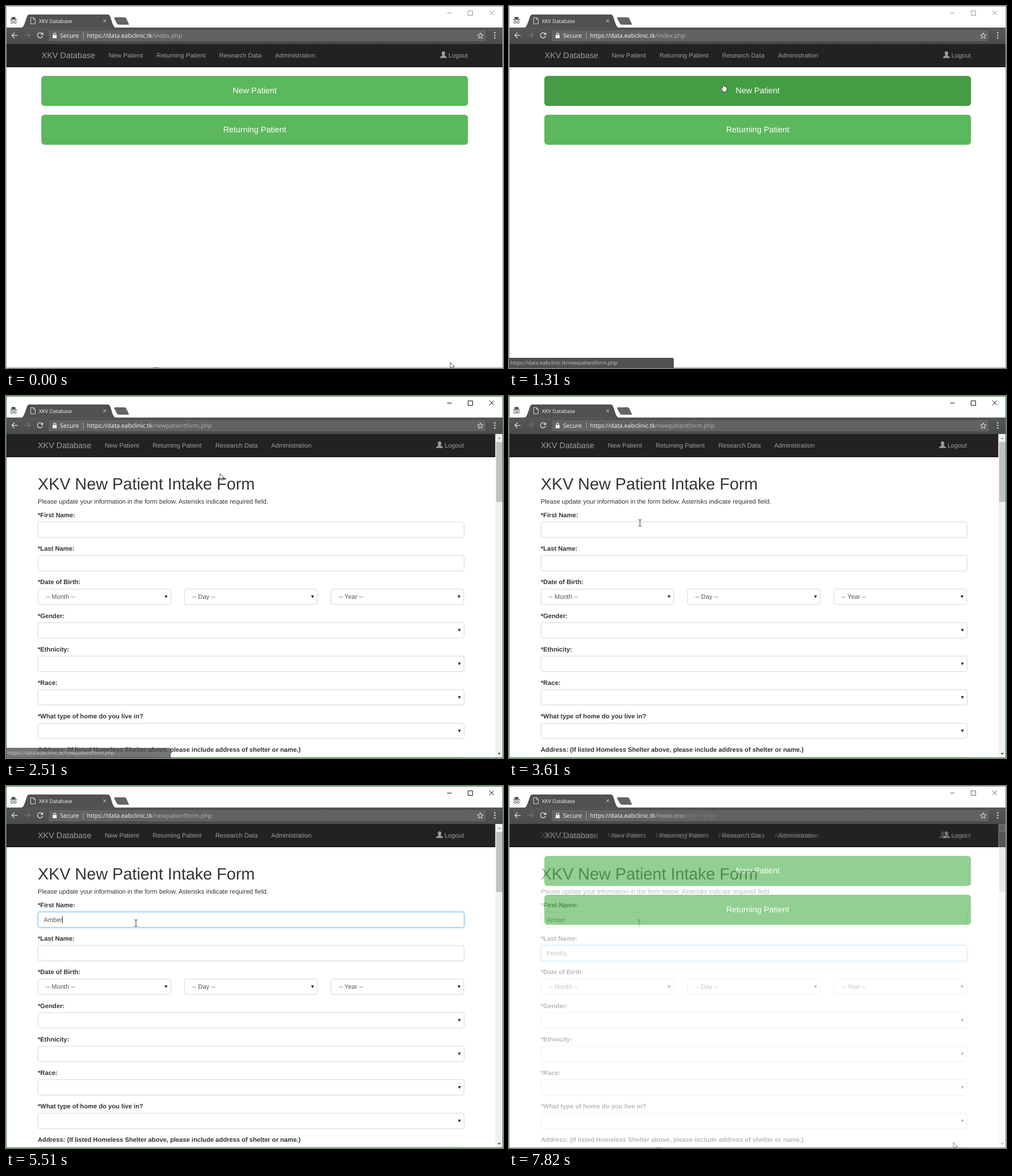
Animation, 876 px wide and 639 px high, one loop 7.89 s. Source, as an HTML page:

```html
<!DOCTYPE html>
<html lang="en">
<head>
<meta charset="utf-8">
<title>XKV Database</title>
<style>
  html, body { margin: 0; width: 100%; height: 100%; overflow: hidden; background: #fff; }
  svg { display: block; }
  text { font-family: "Liberation Sans", Arial, sans-serif; font-size: 11.2px; text-rendering: geometricPrecision; white-space: pre; }
  .ui { font-family: "Open Sans", "Noto Sans", sans-serif; }
  .nav text { fill: #9d9d9d; }
  .label { font-weight: 700; fill: #333; }
  .value { fill: #555; }
  .btn { fill: #5cb85c; stroke: #4cae4c; stroke-width: .8; }
  .btn.hover { fill: #449d44; stroke: #398439; }
  .btn.down { fill: #398439; stroke: #255625; }
  .field { fill: #fff; stroke: #ccc; stroke-width: .8; }
  .field.focus { stroke: #66afe9; filter: drop-shadow(0 0 2.5px rgba(102, 175, 233, .6)); }
  .line { fill: none; }
</style>
</head>
<body>
<svg id="stage" width="876" height="639" viewBox="0 0 876 639">
  <defs>
    <linearGradient id="bar" x1="0" y1="0" x2="0" y2="1">
      <stop offset="0" stop-color="#565757"/><stop offset="1" stop-color="#4a4b4b"/>
    </linearGradient>
    <linearGradient id="press" x1="0" y1="0" x2="0" y2="1">
      <stop offset="0" stop-opacity=".18"/><stop offset="1" stop-opacity="0"/>
    </linearGradient>
  </defs>
  <g id="form"></g>
  <g id="home"></g>
</svg>
<script>
const LOOP = 7890, SWAP = 2190, ACTIVE = 1950, FADE = 7620;
const SITE = 'data.eabclinic.tk';
const FIELD_TOP = 222.4, ROW = 59.2, SHIFT = -6.8;

// time, x, y of the pointer hotspot
const PATH = [
  [50, 783, 629], [300, 640, 480], [560, 443, 280], [700, 408, 222],
  [810, 404, 200], [860, 400, 185], [980, 386, 152], [1200, 378, 138],
  [1380, 377, 137], [3070, 377, 137], [3200, 350, 152], [3400, 270, 190],
  [3610, 231, 224], [3700, 221, 229], [3810, 219, 230], [3930, 225, 237],
  [4000, 229, 242]
];
const FIRST = { word: 'Amber', keys: [4840, 5120, 5260, 5390, 5450] };
const LAST = { word: 'Pendry', keys: [6300, 6620, 6700, 6880, 6980, 7080] };

const $ = id => document.getElementById(id);
const rect = (x, y, w, h, fill, more = '') =>
  `<rect x="${x}" y="${y}" width="${w}" height="${h}" fill="${fill}" ${more}/>`;
const text = (x, y, str, more = '') => `<text x="${x}" y="${y}" ${more}>${str}</text>`;
const line = (d, color, width = 1, more = '') =>
  `<path class="line" d="${d}" stroke="${color}" stroke-width="${width}" ${more}/>`;
const fill = (d, color, more = '') => `<path d="${d}" fill="${color}" ${more}/>`;

const POINTERS = {
  arrow: fill('M0 0V10.6L2.5 8.4 4.2 12.2 5.9 11.4 4.3 7.7H7.6Z', '#fff', 'stroke="#222" stroke-width=".8"'),
  hand: fill('M-.9 .6Q0-.8 .9 .6V4.8Q2-.1 2.9 5Q4.2 4 4.7 5.6Q6.3 4.8 6.6 6.6V10Q6.2 12 5.2 14H-.4Q-1.2 11.6-3.1 9Q-4.3 7.2-3 6.9Q-2-.1-.9 8.4Z'.replace('Q-2-.1-.9 8.4', 'Q-2 7-.9 8.4'),
    '#fff', 'stroke="#222" stroke-width=".8" stroke-linejoin="round"'),
  beam: line('M-2.6-5.6H-.7L0-5 .7-5.6H2.6M0-5V5M-2.6 5.6H-.7L0 5 .7 5.6H2.6', '#333', 1)
};
const pointer = id => `<g id="${id}">` + Object.entries(POINTERS)
  .map(([kind, art]) => `<g data-kind="${kind}">${art}</g>`).join('') + '</g>';

function tabStrip(ink) {
  return rect(0, 0, 876, 639, '#fff') +
    fill('M9.3 23.2 10.2 19.3 12 19.8 13.3 19.3 15.2 19.8 16 19.3 17.3 23.2Z', '#444') +
    line('M7 24.4H19.6', '#444', 1.1) +
    '<g fill="none" stroke="#444"><circle cx="10.4" cy="28.7" r="2"/><circle cx="16.2" cy="28.7" r="2"/></g>' +
    line('M12.4 28.2H14.2', '#444') +
    fill('M28 38C32 37 35 23 37.5 17.5Q38.6 15 41 15H179.500Q182 15 183.200 17.5C186 24 188 37 193 38Z', '#505151') +
    line('M43.5 20.5H48.500L51.500 23.5V31.500H43.500ZM48.500 20.500V23.500H51.500', '#e6e6e6', .9) +
    text(58, 29.7, 'XKV Database', 'class="ui" style="font-size:9.1px" fill="#f4f4f4"') +
    line('M171.400 23.700 176.400 28.700M176.400 23.700 171.400 28.700', '#ddd', 1) +
    fill('M192 20H209Q211 20 212 22L217 33H199Q196.500 33 195.500 31L190.500 21.500Q190 20 192 20Z', '#636464') +
    line('M777.5 12.5H785.5M814.5 8.5H822.5V16.500H814.500ZM852 8 860 16M860 8 852 16', ink);
}

function toolbar(page) {
  const star = Array.from({ length: 10 }, (_, i) => {
    const a = i * Math.PI / 5 - Math.PI / 2, r = i % 2 ? 2.3 : 5.4;
    return (836 + r * Math.cos(a)).toFixed(1) + ' ' + (52.7 + r * Math.sin(a)).toFixed(1);
  }).join('L');
  return rect(0, 38, 876, 29, 'url(#bar)') +
    rect(74.5, 41.5, 772, 21.5, '#616262', 'rx="2" stroke="#434444"') +
    line('M20.500 51.800H10.500M15 47 10.300 51.800 15 56.600', '#e2e2e2', 1.3) +
    line('M32.500 51.800H42.500M38 47 42.700 51.800 38 56.600', '#777', 1.3) +
    line('M63.800 48.900A4.600 4.600 0 1 0 64.500 53', '#e2e2e2', 1.3) +
    fill('M65.500 46.500V51H61Z', '#e2e2e2') +
    rect(82.3, 51.300, 7, 5.500, '#fff', 'rx=".6"') +
    line('M83.800 51.500V49.800A2 2 0 0 1 87.800 49.800V51.500', '#fff', 1.1) +
    text(95.3, 56, 'Secure', 'class="ui" style="font-size:10.5px" fill="#fff"') +
    line('M136.500 46V59', '#a0a0a0') +
    text(142.8, 56, `https://${SITE}<tspan fill="#b4b4b4">/${page}</tspan>`,
      'class="ui" style="font-size:10.5px" fill="#fff"') +
    line(`M${star}Z`, '#e8e8e8', 1) +
    [47.5, 52, 56.5].map(y => `<circle cx="861.500" cy="${y}" r="1.250" fill="#e2e2e2"/>`).join('');
}

function navbar(width, shift) {
  const links = [[181, 'New Patient'], [265.3, 'Returning Patient'], [375.8, 'Research Data'], [474.3, 'Administration']];
  return rect(0, 67, width, 41, '#222') + rect(0, 107, width, 1, '#080808') +
    `<g class="nav" transform="translate(${shift} 0)">` +
    text(62.8, 92, 'XKV Database', 'style="font-size:14.4px"') +
    links.map(([x, name]) => text(x, 90.900, name)).join('') +
    fill('M771 80C773.500 80 774.300 82 773.900 84.200 773.700 86 772.900 86.700 772.900 87.600 774 88.900 777 88.700 777 91.700H765C765 88.700 768 88.900 769.100 87.600 769.100 86.700 768.300 86 768.100 84.200 767.700 82 768.500 80 771 80Z', '#9d9d9d') +
    text(779.7, 90.900, 'Logout') + '</g>';
}

const button = (id, y, label) =>
  rect(62.8, y, 751, 52, '', `id="${id}" rx="4.8" class="btn"`) +
  text(438.3, y + 30.3, label, 'text-anchor="middle" style="font-size:14.4px" fill="#fff"');

const frame = color => rect(.5, .5, 875, 638, 'none', `stroke="${color}"`);

function status(id) {
  return `<g id="${id}">` + fill('M0 639V621H287Q290.500 621 290.500 624V639Z', '#4f5050') +
    text(2.5, 633.3, `https://${SITE}/newpatientform.php`, 'class="ui" style="font-size:9px" fill="#c6c6c6"') + '</g>';
}

const box = (x, y, w, id = '') => rect(x, y, w, 27.2, '', `class="field" rx="3.2" ${id && `id="${id}"`}`);
const drop = (x, y, w, label = '') => box(x, y, w) +
  text(x + 13.4, y + 17.3, label, 'class="value"') +
  fill(`M${x + w - 11} ${y + 11.300}h5.400l-2.700 5z`, '#333');

function intake() {
  const labels = ['*First Name:', '*Last Name:', '*Date of Birth:', '*Gender:', '*Ethnicity:', '*Race:',
    '*What type of home do you live in?',
    'Address: (If listed Homeless Shelter above, please include address of shelter or name.)'];
  const top = i => FIELD_TOP + ROW * i;
  const input = (i, id) => box(56.4, top(i), 751, id + 'Box') +
    text(66.4, top(i) + 17.3, '', `class="value" id="${id}"`) +
    rect(66, top(i) + 7, 1, 13.4, '#333', `id="${id}Caret"`);
  return text(56, 165, 'XKV New Patient Intake Form', 'style="font-size:28.8px" fill="#333"') +
    text(56, 190, 'Please update your information in the form below. Asterisks indicate required field.', 'fill="#333"') +
    labels.map((s, i) => text(56, 214 + ROW * i, s, 'class="label"')).join('') +
    input(0, 'first') + input(1, 'last') +
    ['Month', 'Day', 'Year'].map((s, i) => drop(56.4 + 258.200 * i, top(2), 234, `-- ${s} --`)).join('') +
    [3, 4, 5, 6].map(i => drop(56.4, top(i), 751)).join('') + box(56.4, top(7), 751);
}

const scrollbar = () => rect(862.600, 67, 13.400, 572, '#f1f1f1') + rect(864, 81, 11, 106, '#c1c1c1') +
  fill('M866.500 76h5.600l-2.800-3.200z', '#a3a3a3') + fill('M866.500 630h5.600l-2.800 3.200z', '#505050');

$('home').innerHTML =
  `<g id="idle">${tabStrip('#999')}</g><g id="awake">${tabStrip('#111')}</g>` +
  toolbar('index.php') + navbar(876, 0) +
  button('fresh', 123.9, 'New Patient') + button('again', 192.4, 'Returning Patient') +
  rect(63.2, 124.2, 750, 5, 'url(#press)', 'id="shade" rx="4"') +
  `<g id="idleFrame">${frame('#a9a9a9')}${rect(259, 638, 11, 1, '#555')}</g><g id="awakeFrame">${frame('#358a3a')}</g>` +
  status('homeStatus') + pointer('homePointer');
$('form').innerHTML = tabStrip('#111') + toolbar('newpatientform.php') + navbar(862.600, SHIFT) +
  intake() + scrollbar() + frame('#358a3a') + status('formStatus') + pointer('formPointer');

const show = (id, on) => { $(id).style.display = on ? '' : 'none'; };
const ramp = (t, a, b) => Math.min(1, Math.max(0, (t - a) / (b - a)));

function place(t) {
  const i = PATH.findIndex(p => p[0] > t);
  if (i === 0) return PATH[0].slice(1);
  if (i < 0) return PATH[PATH.length - 1].slice(1);
  const [t0, x0, y0] = PATH[i - 1], [t1, x1, y1] = PATH[i], k = ramp(t, t0, t1);
  return [x0 + (x1 - x0) * k, y0 + (y1 - y0) * k];
}

function setPointer(id, [x, y], kind) {
  const g = $(id);
  g.setAttribute('transform', `translate(${x.toFixed(2)} ${y.toFixed(2)})`);
  for (const c of g.children) c.style.display = c.dataset.kind === kind ? '' : 'none';
}

function drawHome(t) {
  const at = place(t), y = at[1];
  const onFresh = y > 124 && y < 176, onAgain = y > 192 && y < 245;
  const awake = t >= ACTIVE, down = awake && t < 2120;
  $('fresh').setAttribute('class', 'btn' + (down ? ' down' : onFresh ? ' hover' : ''));
  $('again').setAttribute('class', 'btn' + (onAgain ? ' hover' : ''));
  show('shade', down);
  show('awake', awake); show('awakeFrame', awake);
  show('idle', !awake); show('idleFrame', !awake);
  $('homeStatus').style.opacity = ramp(t, 1130, 1300);
  setPointer('homePointer', at, onFresh || onAgain ? 'hand' : 'arrow');
}

function drawInput(id, { word, keys }, t, focus, caret) {
  const el = $(id);
  el.textContent = word.slice(0, keys.filter(k => k <= t).length);
  $(id + 'Box').setAttribute('class', focus ? 'field focus' : 'field');
  show(id + 'Caret', caret);
  if (caret) $(id + 'Caret').setAttribute('x', 66.1 + (el.textContent ? el.getComputedTextLength() : 0));
}

function drawForm(t) {
  const at = place(t), y = at[1];
  const onText = (y > 140 && y < 171) || (y > 179 && y < 193) || y > 222;
  const onFirst = t >= 4000 && t < 5820, onLast = t >= 5820;
  drawInput('first', FIRST, t, onFirst, onFirst && (t < 4480 || t >= 4700));
  drawInput('last', LAST, t, onLast, onLast && t < FADE);
  $('formStatus').style.opacity = 1 - ramp(t, 2460, 2700);
  setPointer('formPointer', at, onText ? 'beam' : 'arrow');
  show('formPointer', t < 4840 || t >= 5450);
}

function draw(t) {
  const mix = t < SWAP ? 1 : t < 7750 ? 0 : t < 7820 ? 1 / 3 : 2 / 3;
  show('home', mix > 0);
  show('form', mix < 1);
  $('home').style.opacity = mix;
  if (mix > 0) drawHome(t < SWAP ? t : 0);
  if (mix < 1) drawForm(t);
}

const start = performance.now();
function tick() {
  draw((performance.now() - start) % LOOP);
  requestAnimationFrame(tick);
}
tick();
</script>
</body>
</html>
```
